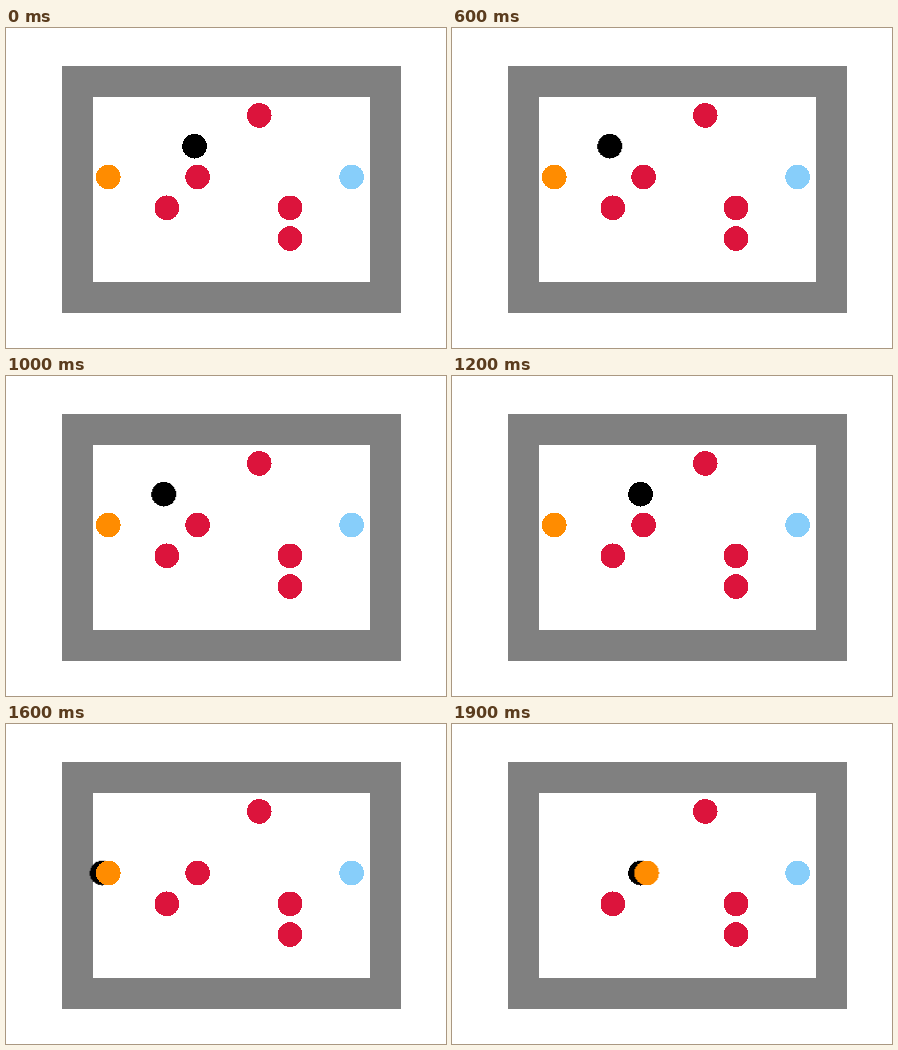
An HTML page for the animation above (2000 ms loop, 440 by 320 pixels).

```html
<!DOCTYPE html>
<html lang="en">
<head>
<meta charset="utf-8">
<title>Grid world</title>
<style>
  html, body { margin: 0; width: 100%; height: 100%; overflow: hidden; background: #fff; }
  svg { display: block; }
</style>
</head>
<body>
<svg id="stage" width="440" height="320" viewBox="0 0 440 320" shape-rendering="crispEdges">
  <rect x="56" y="38" width="339" height="247" fill="#808080"/>
  <rect x="87" y="69" width="277" height="185" fill="#fff"/>
</svg>
<script>
const CELL = 30.8, RADIUS = 12.32, STEP = 100;
const stage = document.getElementById('stage');

// Each kind of disc sits at its own horizontal offset within a cell.
function disc(col, row, offset, fill) {
  const el = document.createElementNS('http://www.w3.org/2000/svg', 'circle');
  el.setAttribute('cx', 56.1 + (col + offset) * CELL);
  el.setAttribute('cy', 56.6 + row * CELL);
  el.setAttribute('r', RADIUS);
  el.setAttribute('fill', fill);
  return stage.appendChild(el);
}

// Hold each [col, row] for one step, relative to the first cell.
function walk(el, cells) {
  const [col0, row0] = cells[0];
  const frames = cells.map(([col, row], i) => ({
    offset: i / cells.length,
    easing: 'step-end',
    transform: `translate(${(col - col0) * CELL}px, ${(row - row0) * CELL}px)`
  }));
  frames.push({ ...frames[frames.length - 1], offset: 1 });
  el.animate(frames, { duration: cells.length * STEP, iterations: Infinity });
}

for (const [col, row] of [[6, 1], [4, 3], [3, 4], [7, 4], [7, 5]]) {
  disc(col, row, 0.4, '#dc143c');
}
disc(9, 3, 0.4, '#87cefa');
const agent = disc(4, 2, 0.3, '#000');
const cargo = disc(1, 3, 0.5, '#ff8c00');

// The agent wanders along one row, then fetches the cargo.
const wander = [4, 3, 2, 4, 3, 2, 3, 4, 3, 4, 3, 2, 4, 3, 2, 1].map(col => [col, 2]);
const carry = [1, 2, 3, 4].map(col => [col, 3]);
walk(agent, [...wander, ...carry]);
walk(cargo, [...wander.map(() => [1, 3]), ...carry]);
</script>
</body>
</html>
```
